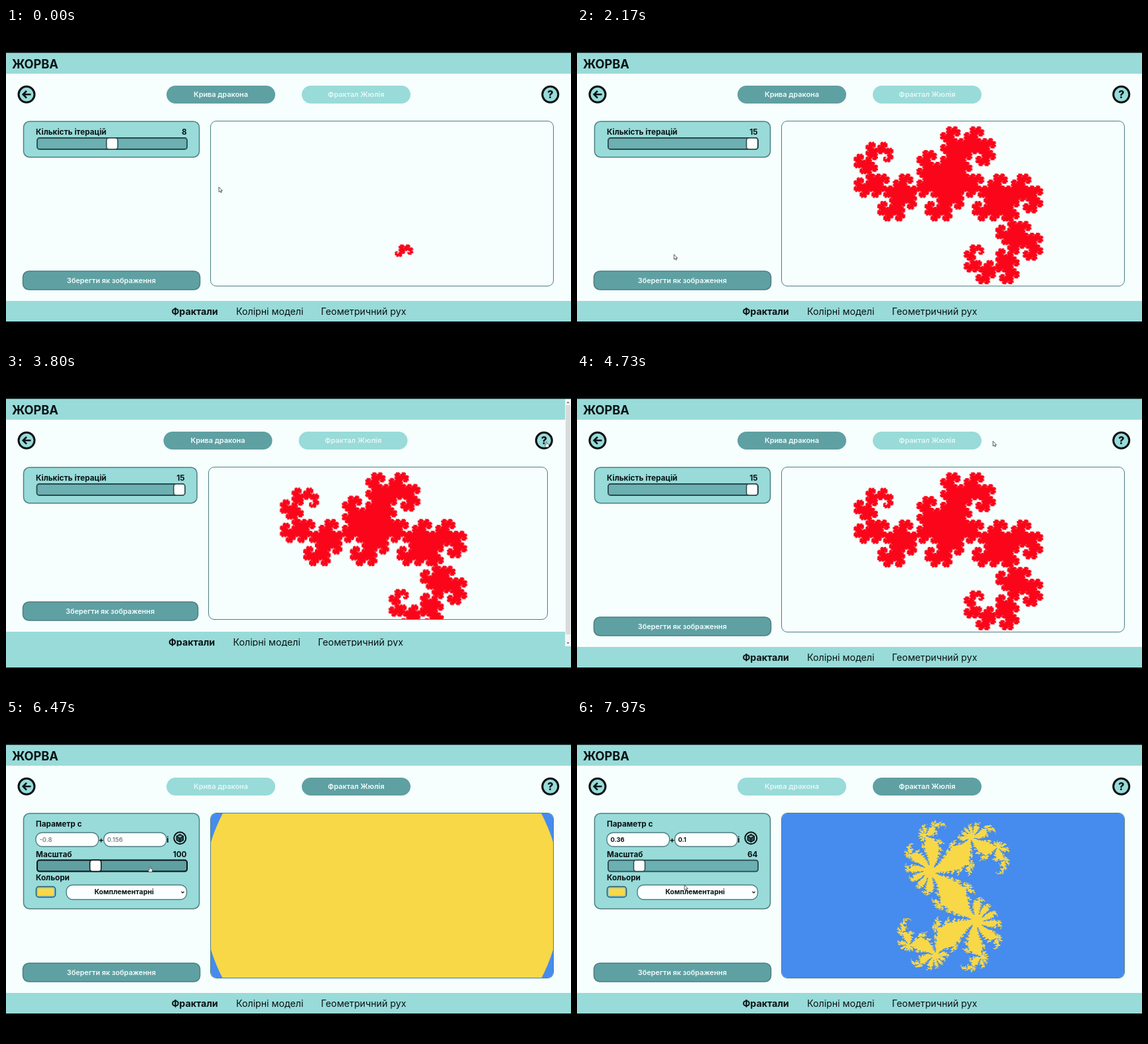
An HTML page with a canvas for the animation above (8000 ms loop, 852x480 px).

```html
<!DOCTYPE html>
<html lang="uk">
<head>
<meta charset="utf-8">
<title>Фрактали</title>
<style>
html, body { margin: 0; width: 100%; height: 100%; overflow: hidden; background: #000; }
#stage { --mint: #98dbd9; --teal: #5fa0a3; --paper: #f6fffe; --line: #4d7f83; --gold: #f8d847;
  position: relative; width: 852px; height: 480px; overflow: hidden; }
svg { position: absolute; left: 0; top: 0; }
text { font-family: Inter, "Open Sans", sans-serif; font-weight: 700; font-size: 11.7px; fill: #0a1214; }
.mid { text-anchor: middle; }
.end { text-anchor: end; }
.mint { fill: var(--mint); }
.paper { fill: var(--paper); }
.box { fill: #fbffff; stroke: var(--line); stroke-width: 1.4; }
.tab rect { fill: var(--mint); }
.tab text { font-size: 10.9px; font-weight: 600; fill: #e4f8f6; }
.tab.on rect, #save { fill: var(--teal); }
.tab.on text, #saveText { fill: #f1fdfc; }
#saveText { font-size: 10.8px; font-weight: 600; }
#panel, #save { stroke: var(--line); stroke-width: 1.5; }
#panel { width: 265px; height: 54px; }
#save { x: 25.5px; y: 367px; width: 267px; height: 28px; }
#footer text { font-size: 14.2px; }
#footer .thin { font-weight: 400; }
#track { x: 47px; y: 166px; width: 226px; height: 17px; fill: #6bb0b2; stroke: #28484c; stroke-width: 1.8; }
#thumb { fill: #fcfffe; stroke: #28484c; stroke-width: 1.5; }
.hover #track { fill: var(--teal); stroke: #0b1214; stroke-width: 2; }
.hover #thumb { stroke: #0b1214; }
#julia, #bar, #scroll, #gap { display: none; }
.param { font-size: 9.3px; }
.hint { fill: #7d8486; font-weight: 600; }
#frame { position: absolute; box-sizing: border-box; left: 308px; top: 140px; width: 518px; height: 250px;
  border: 1.7px solid var(--line); border-radius: 9px; overflow: hidden; background: var(--paper); }
#view { display: block; width: 100%; height: auto; }
.inJulia #julia { display: inline; }
.inJulia #panel { height: 144px; }
.inJulia #slider { transform: translateY(45.6px); }

.narrow #scroll, .narrow #gap { display: inline; }
.narrow #tabs, .narrow #footer { transform: translateX(-4.5px); }
.narrow #footText { transform: translateY(-22.7px); }
.narrow #footer .mint { y: 389px; height: 54px; }
.narrow #help { transform: translateX(-9.5px); }
.narrow #panel { width: 261.5px; }
.narrow #track { x: 46.5px; width: 223px; }
.narrow #value { transform: translateX(-3px); }
.narrow #save { y: 344px; width: 264px; }
.narrow #saveText { transform: translate(-1.7px, -23px); }
.narrow #frame { left: 305px; width: 512px; height: 231px; }
.loaded #bar { display: inline; }
#bar text { font-family: "Noto Sans", "Open Sans", sans-serif; font-size: 6.6px; font-weight: 400; fill: #b59aae; }
#bar #all { font-weight: 700; font-size: 6.7px; fill: #f3d5ee; }
</style>
</head>
<body>
<div id="stage">
  <svg width="852" height="480">
    <rect class="paper" y="37" width="852" height="406"/>
    <rect class="mint" y="38" width="852" height="31"/>
    <path d="M0 37.5H852" stroke="#4f7a7c"/>
    <text x="9" y="61" style="font-size:18.2px">ЖОРВА</text>

    <g fill="none" stroke="#0a1214" stroke-width="3">
      <circle class="mint" cx="31" cy="100.3" r="12"/>
      <path d="M37.5 100.3H26M31 95l-5.3 5.3 5.3 5.3" stroke-width="2.6"/>
    </g>
    <g id="help">
      <circle class="mint" cx="820.8" cy="100.3" r="12" stroke="#0a1214" stroke-width="3"/>
      <text class="mid" x="820.8" y="106" style="font-size:16px;font-weight:800">?</text>
    </g>

    <g id="tabs">
      <g class="tab" id="dragonTab">
        <rect x="242" y="87" width="164" height="27" rx="13.5"/>
        <text class="mid" x="324" y="104.3">Крива дракона</text>
      </g>
      <g class="tab" id="juliaTab">
        <rect x="446" y="87" width="164" height="27" rx="13.5"/>
        <text class="mid" x="528" y="104.3">Фрактал Жюлія</text>
      </g>
    </g>

    <rect id="panel" class="mint" x="26.5" y="141" rx="9"/>
    <g id="slider">
      <text id="label" x="45" y="161.3"></text>
      <text id="value" class="end" x="272.5" y="161.3"></text>
      <rect id="track" rx="3.5"/>
      <rect id="thumb" y="166" width="17" height="17" rx="3.5"/>
    </g>
    <g id="julia">
      <text x="45" y="161.3">Параметр с</text>
      <rect class="box" x="45" y="170" width="94.5" height="21" rx="9.5"/>
      <rect class="box" x="147.5" y="170" width="94.5" height="21" rx="9.5"/>
      <text class="param" id="re" x="50.5" y="184"></text>
      <text class="param" id="im" x="152.5" y="184"></text>
      <text class="mid" x="143.5" y="184.5">+</text>
      <text class="mid" x="243.8" y="184.5">i</text>
      <g fill="none" stroke="#0a1214" stroke-width="2">
        <circle cx="262.3" cy="178.3" r="9"/>
        <path d="M262.3 172.5l5 2.8v6l-5 3-5-3v-6zM257.3 175.3l5 3 5-3M262.3 178.3v6" fill="#335156" stroke-width="1.4"/>
      </g>
      <text x="45" y="242">Кольори</text>
      <rect x="45.5" y="251.5" width="29" height="16" rx="4" fill="#8fc9cf" stroke="#2c5a62" stroke-width="1.5"/>
      <rect x="48" y="254" width="24" height="11" rx="1" fill="var(--gold)"/>
      <rect class="box" x="91" y="249" width="181.5" height="22" rx="9.5"/>
      <text class="mid" x="178" y="263.3" style="font-size:10.5px">Комплементарні</text>
      <path d="M264.5 259l2 2 2-2" fill="none" stroke="#111" stroke-width="1.2"/>
    </g>

    <rect id="save" rx="9"/>
    <text id="saveText" class="mid" x="158.8" y="384.8">Зберегти як зображення</text>

    <g id="footer">
      <rect class="mint" y="412" width="862" height="31"/>
      <g id="footText">
        <text x="249.5" y="432.6">Фрактали</text>
        <text class="thin" x="347" y="432.6">Колірні моделі</text>
        <text class="thin" x="475" y="432.6">Геометричний рух</text>
      </g>
    </g>
    <rect id="gap" class="mint" y="411" width="852" height="32"/>
    <g id="scroll">
      <rect x="843" y="38" width="9" height="373" fill="#f4f6f6"/>
      <rect x="844" y="47" width="7" height="346" fill="#d9dbda"/>
      <path d="M845.5 44l2-2.5 2 2.5zM845.5 405l2 2.5 2-2.5z" fill="#6b6a6b"/>
    </g>
    <rect y="443" width="852" height="37"/>
  </svg>

  <div id="frame"><canvas id="view" width="517" height="249"></canvas></div>

  <svg width="852" height="480">
    <g id="bar">
      <rect y="411" width="852" height="32" fill="#4a424a"/>
      <rect y="411" width="187" height="32" fill="#6b4667"/>
      <path d="M12.5 422.5h4l2.5 2.5v6.5h-6.5z" fill="#e0d5dc"/>
      <path d="M14.5 428h2.5" stroke="#6b4667"/>
      <text x="27" y="429.5">Відкривається файл myCanvas (18).png...</text>
      <path d="M171 428.5l2.3-2.5 2.3 2.5" fill="none" stroke="#f0dcec" stroke-width="1.3"/>
      <rect x="769.5" y="416.5" width="62.5" height="20.5" rx="10.2" fill="none" stroke="#b58cb0"/>
      <text id="all" class="mid" x="800.8" y="429.3">Показати все</text>
      <path d="M839.8 424.3l5 5M844.8 424.3l-5 5" stroke="#f0dcec" stroke-width="1.2"/>
    </g>
    <g id="cursor" fill="#fcfffe" stroke="#4a4a4a" stroke-width=".9">
      <path id="arrow" d="M0 0V7.5L1.8 6 3 8.5 4.2 8 3.1 5.6H5.3Z"/>
      <path id="hand" transform="scale(.8)" d="M-1 .8Q0-.6 1 .8V4L4.6 5V8L3.5 10.5H-1.6L-3.6 6.5-2.6 5.8-1 7Z"/>
    </g>
  </svg>
</div>

<script>
const LOOP = 8000;
const $ = id => document.getElementById(id);
const stage = $('stage'), ctx = $('view').getContext('2d');
const W = 517, H = 249;
const GOLD = [248, 216, 71, 255], BLUE = [70, 139, 238, 255];
const css = color => `rgb(${color.slice(0, 3)})`;

// time, x, y, hand (1) or arrow (0) on the way to the next stop
const path = [
  [0, 321, 240, 0], [120, 321, 240, 0], [600, 160, 168, 1], [800, 160, 168, 1],
  [1500, 204, 161, 1], [1580, 206, 162, 1], [1860, 264, 168, 1], [1960, 264, 170, 0],
  [2250, 120, 380, 1], [2400, 118, 382, 0], [2680, 96, 419, 0], [2780, 96, 419, 0],
  [3060, 841, 424, 0], [3160, 841, 424, 0], [3340, 836, 190, 0], [3700, 815, 102, 1],
  [4300, 815, 102, 0], [5000, 535, 101, 1], [5300, 535, 101, 0], [5630, 584, 118, 0],
  [5850, 584, 122, 0], [6430, 217, 221, 1], [6490, 217, 221, 0], [6640, 262, 177, 1],
  [6790, 262, 177, 0], [7030, 135, 217, 1], [7100, 135, 217, 1], [7660, 94, 220, 1],
  [7730, 94, 222, 0], [7960, 162, 249, 0], [LOOP, 162, 249, 0]
];

const clamp = v => Math.min(1, Math.max(0, v));
const smooth = v => v * v * (3 - 2 * v);
const ramp = (t, from, to) => smooth(clamp((t - from) / (to - from)));
const within = (t, from, to) => t >= from && t < to;

function dragonSteps(t) {
  return 8 + Math.round(3 * ramp(t, 800, 1560)) + Math.round(4 * ramp(t, 1570, 1870));
}

function drawDragon(order) {
  const unit = 1.115, dx = [1, 0, -1, 0], dy = [0, -1, 0, 1];
  let x = 299, y = 198, dir = 2;
  ctx.clearRect(0, 0, W, H);
  ctx.beginPath();
  ctx.moveTo(x, y);
  for (let k = 1; k <= 2 ** order; k++) {
    x += dx[dir] * unit;
    y += dy[dir] * unit;
    ctx.lineTo(x, y);
    dir = (dir + (((k & -k) << 1) & k ? 3 : 1)) % 4;
  }
  ctx.strokeStyle = '#fa0519';
  ctx.lineWidth = 2;
  ctx.stroke();
}

function drawDisc() {
  ctx.fillStyle = css(BLUE);
  ctx.fillRect(0, 0, W, H);
  ctx.fillStyle = css(GOLD);
  ctx.beginPath();
  ctx.arc(W / 2, H / 2, 271, 0, 7);
  ctx.fill();
}

function escapes(x, y) {
  for (let i = 0; i < 80; i++) {
    const xx = x * x, yy = y * y;
    if (xx + yy > 4) return true;
    y = 2 * x * y + 0.1;
    x = xx - yy + 0.36;
  }
  return false;
}

function drawJulia(zoom) {
  const img = ctx.createImageData(W, H), unit = zoom * 1.6;
  for (let py = 0, p = 0; py < H; py++) {
    for (let px = 0; px < W; px++, p += 4) {
      const out = escapes((px - W / 2) / unit, (py - H / 2) / unit);
      img.data.set(out ? BLUE : GOLD, p);
    }
  }
  ctx.putImageData(img, 0, 0);
}

let drawn = '';
function drawOnce(key, draw, arg) {
  if (key === drawn) return;
  drawn = key;
  draw(arg);
}

function moveCursor(t) {
  const i = Math.max(0, path.findIndex(p => p[0] > t) - 1);
  const [t0, x0, y0, hand] = path[i], [t1, x1, y1] = path[i + 1];
  const k = ramp(t, t0, t1);
  $('cursor').setAttribute('transform', `translate(${x0 + (x1 - x0) * k} ${y0 + (y1 - y0) * k})`);
  $('arrow').style.display = hand ? 'none' : '';
  $('hand').style.display = hand ? '' : 'none';
}

function setParam(id, text, isHint) {
  $(id).textContent = text;
  $(id).classList.toggle('hint', isHint);
}

function render(t) {
  const julia = t >= 5200, random = t >= 6770, narrow = within(t, 2450, 3950);
  const order = dragonSteps(t);
  const zoom = Math.round(100 - 36 * ramp(t, 7100, 7660));
  const set = (name, on) => stage.classList.toggle(name, on);

  set('inJulia', julia);
  set('narrow', narrow);
  set('loaded', within(t, 2450, 3150));
  set('hover', within(t, 560, 2020) || within(t, 6400, 6530) || within(t, 7010, 7750));
  $('dragonTab').classList.toggle('on', !julia);
  $('juliaTab').classList.toggle('on', julia);

  $('label').textContent = julia ? 'Масштаб' : 'Кількість ітерацій';
  $('value').textContent = julia ? zoom : order;
  const thumb = julia ? 94 + (zoom - 64) * 1.139
    : narrow ? 55.5 + (order - 1) * 14.7 : 56 + (order - 1) * 14.86;
  $('thumb').setAttribute('x', thumb - 8.5);
  setParam('re', random ? '0.36' : '-0.8', !random);
  setParam('im', random ? '0.1' : '0.156', !random);

  if (random) drawOnce('julia' + zoom, drawJulia, zoom);
  else if (julia) drawOnce('disc', drawDisc);
  else drawOnce('dragon' + order, drawDragon, order);
  moveCursor(t);
}

const start = performance.now();
function tick() {
  render((performance.now() - start) % LOOP);
  requestAnimationFrame(tick);
}
tick();
</script>
</body>
</html>
```
